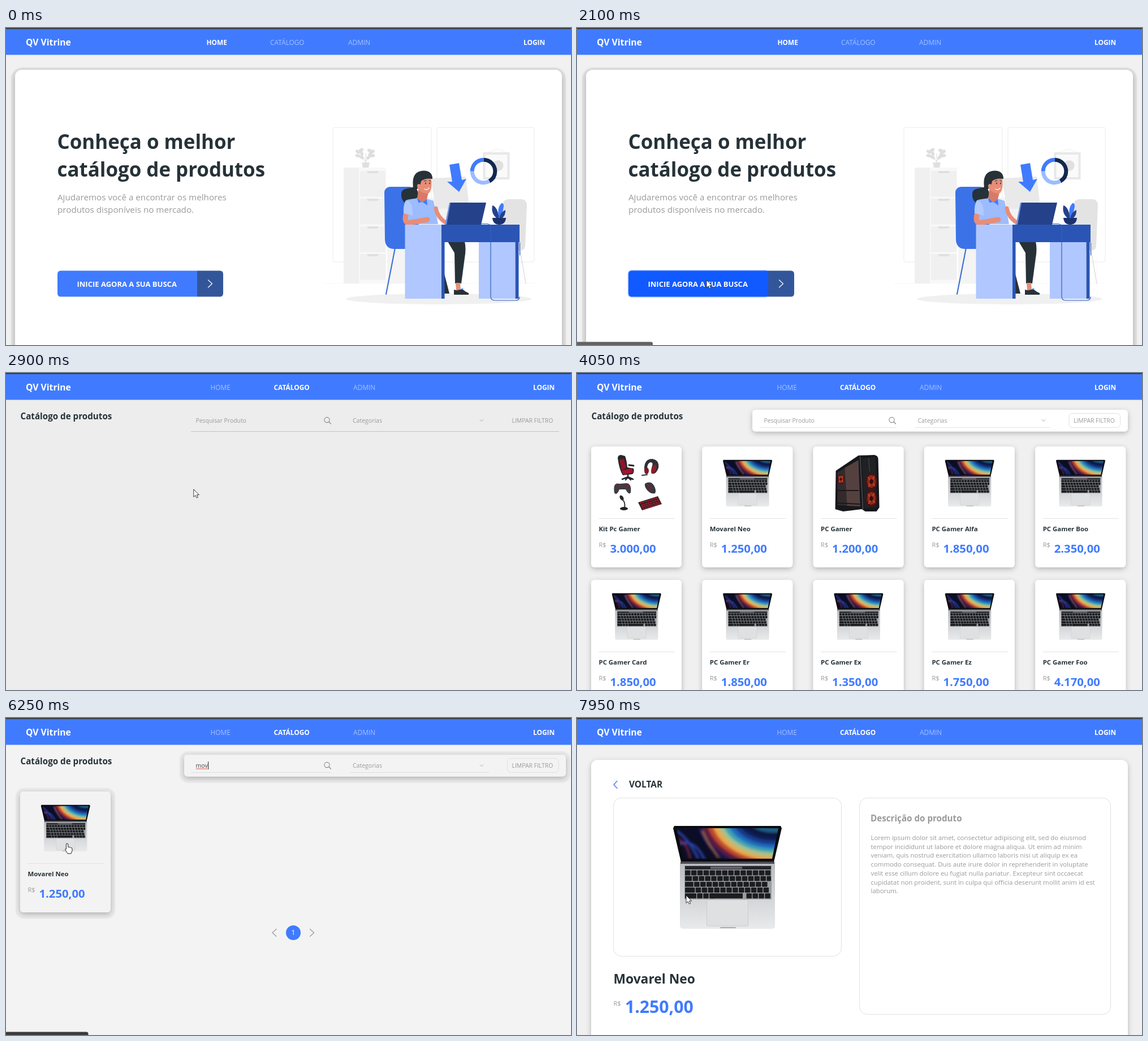
Write an HTML page that moves like this. It is 999 px wide and 561 px high and loops after 8 s.

```html
<!DOCTYPE html>
<html lang="pt-BR">
<head>
<meta charset="utf-8">
<style>
html, body { margin: 0; width: 100%; height: 100%; overflow: hidden; }
svg { display: block; width: 999px; height: 561px; font-family: "Open Sans", sans-serif; }
text { white-space: pre; }
</style>
</head>
<body>
<svg id="stage" viewBox="0 0 999 561"></svg>
<script>
const BLUE = '#407bff', INK = '#263238', GREY = '#9a9a9a', SKIN = '#e88d77';
const NAVY = '#24418a', DESK = '#2a55b5', PALE = '#b0c7ff';
const BRAND = 'QV Vitrine', LAPTOP = 'Movarel Neo', QUERY = 'mov';
const SHADOW = 'filter="url(#shadow)"';

const text = (x, y, s, size, fill = INK, weight = 700, extra = '') =>
  `<text x="${x}" y="${y}" font-size="${size}" fill="${fill}" font-weight="${weight}" ${extra}>${s}</text>`;
const rect = (x, y, w, h, fill, r = 0, extra = '') =>
  `<rect x="${x}" y="${y}" width="${w}" height="${h}" rx="${r}" fill="${fill}" ${extra}/>`;
const path = (d, fill, extra = '') => `<path d="${d}" fill="${fill}" ${extra}/>`;
const line = (d, color, w = 1, extra = '') =>
  path(d, 'none', `stroke="${color}" stroke-width="${w}" stroke-linecap="round" stroke-linejoin="round" ${extra}`);
const oval = (x, y, rx, ry, fill, extra = '') =>
  `<ellipse cx="${x}" cy="${y}" rx="${rx}" ry="${ry}" fill="${fill}" ${extra}/>`;
const group = (id, s) => `<g id="${id}">${s}</g>`;
const box = (x, y, w, h, r) => rect(x, y, w, h, 'none', r, 'stroke="#e1e1e1"');

function header(active, xs, login) {
  const names = ['HOME', 'CATÁLOGO', 'ADMIN'];
  return rect(0, 0, 999, 47.5, BLUE) + rect(0, 0, 999, 2, '#3a3d43') + text(35, 31, BRAND, 15.7, '#fff') +
    names.map((n, i) => text(xs[i], 30, n, 11.9, i == active ? '#fff' : '#a5c1ff', i == active ? 700 : 400)).join('') +
    text(login, 30, 'LOGIN', 11.9, '#fff');
}
const narrowHead = header(1, [353.5, 465, 606], 915);
const wideHead = header(1, [361.5, 473.5, 614], 932);
const page = bg => rect(0, 0, 999, 561, bg);

// Laptop, 192 x 183
function laptop() {
  const arcs = ['#1c1550', '#5d1c3c', '#c2492f', '#e8a94c', '#a9c08a', '#39a3b4', '#2368bd', '#163a86', '#101c52', '#0d1640', '#1d5f86']
    .map((c, i) => oval(178, -14, 132 - i * 9, 92 - i * 7, 'none', `stroke="${c}" stroke-width="9.5"`)).join('');
  let keys = '';
  for (let r = 0; r < 5; r++) {
    const first = 9.6 + r * 2.6;
    keys += rect(21, 79.5 + r * 10.2, first, 8.9, '#1b1d21', 1);
    for (let x = 22.3 + first, c = 0; x < 166; x += 10.9, c++) {
      if (r == 4 && c > 2 && c < 8) continue;
      keys += rect(x, 79.5 + r * 10.2, Math.min(9.6, 173 - x), 8.9, '#1b1d21', 1);
    }
  }
  return path('M2 1H190L192 5L178 65H14L0 5z', '#0a0b0e') +
    path('M6 5H186L175 59H18z', '#0b0d26') +
    `<g clip-path="url(#screen)"><g filter="url(#soft)">${arcs}${line('M0 40Q34 14 56 62M6 10Q26 22 44 58', '#2a45b0', 4)}${line('M6 24Q24 28 30 58', '#8d2746', 3)}${line('M52 10Q60 30 80 58', '#c9813f', 2)}</g></g>` +
    rect(12, 64, 168, 119, 'url(#metal)', 5) + rect(13, 64, 166, 4, '#4b4d52') +
    rect(20, 71, 154, 60, '#9b9da1', 1) + rect(21, 72, 152, 6, '#24262b') + rect(66, 73, 56, 4, '#6a6170') +
    keys + rect(65, 120.3, 58, 8.9, '#1b1d21', 1) +
    rect(59.5, 132, 73, 46, '#dfe0e2', 1, 'stroke="#cbcccf"') + rect(83, 180, 28, 2, '#aaa', 1);
}

// Gaming set and tower, drawn inside one 160 x 214 card
const kit = path('M47 21Q47 15 53 15L60 17Q63 25 64 37L75 39Q77 46 73 49L56 51Q50 42 47 21z', '#25272c') +
  path('M50 23L58 22L62 37L54 43z', '#8f1529') + path('M54 43L71 38L75 46L57 50z', '#a2142c') + line('M67 33L75 34', '#25272c', 3) +
  line('M65 50V56M55 58L65 54L74 58M61 59L65 54L70 59', '#24262a', 2.5) +
  path('M94 42Q93 22 108 22Q121 24 119 38Q115 50 107 48Q105 44 108 34Q110 28 105 28Q98 30 99 44Q96 47 94 42z', '#2e3036') +
  oval(111, 40, 4, 8, '#8e1b2c', 'transform="rotate(20 111 40)"') + oval(98, 43, 4, 6, '#7d1a28') + line('M99 50L90 51', '#333', 2) +
  path('M41 82Q38 63 50 66L62 65Q72 65 70 82Q66 86 61 76H50Q45 88 41 82z', '#3b3d43') +
  oval(48, 70, 2.5, 2.5, '#8e1b2c') + oval(64, 70, 2.5, 2.5, '#8e1b2c') +
  path('M95 66Q105 60 111 69Q116 78 113 83Q105 85 98 76Q94 70 95 66z', '#36383d') + line('M99 67Q106 72 107 80', '#8e1b2c', 2) +
  oval(54, 91, 3, 5, '#24262a', 'transform="rotate(-30 54 91)"') + line('M55 94Q61 98 59 109', '#333', 2) + oval(58, 110, 7, 3, '#222') +
  path('M83 99L118 88L125 102L90 113z', '#3a1c22') +
  line('M87 100L117 91M89 104L119 94.5M90 107L121 98M92 110L122 101', '#a51e30', 2, 'stroke-dasharray="1.6 2.6"');
const fan = (x, y, rx, ry) => oval(x, y, rx, ry, '#4a1310') + oval(x, y, rx * .75, ry * .75, '#8f2a1c') +
  line(`M${x - rx * .6} ${y - ry * .5}L${x + rx * .6} ${y + ry * .5}M${x + rx * .5} ${y - ry * .6}L${x - rx * .5} ${y + ry * .6}`, '#d2452b', 1.6) +
  oval(x, y, rx * .3, ry * .3, '#33100e');
const tower = path('M40 43L80 16L108 15Q115 16 115 23L117 108L112 115H92L86 111L53 115L39 111z', '#17181b') +
  path('M43 46L80 24L83 106L43 104z', '#332a2d') + path('M56 38L80 24L83 106L60 105z', '#54413f') +
  line('M42 78L80 78M42 100L82 102', '#1d1719', 2) + fan(49, 58, 6, 9) +
  path('M86 22L110 18L112 108L90 109z', '#202124') + line('M98 21L100 44', '#4a4c52') + fan(103, 62, 10, 15) + fan(103, 92, 10, 15) +
  line('M83 18L88 111', '#4a4d54', 1.5);

function card(x, y, name, price, art, fill = '#fff') {
  return `<g transform="translate(${x} ${y})">` + rect(0, 0, 160, 214, fill, 6, SHADOW) +
    (art || '<use href="#laptop" transform="translate(36.8 23.3) scale(.453)"/>') +
    rect(13.5, 127, 134, 1, '#e1e1e1') + text(13.5, 150, name, 11.4) +
    text(13.5, 178, 'R$', 11, GREY, 400) + text(33.5, 188, price, 20.3, BLUE) + '</g>';
}
const chevron = (x, y, w, h, color = '#999') => line(`M${x - w} ${y - h}L${x + w} ${y}L${x - w} ${y + h}`, color, 1.2);
const pager = (y, color) => chevron(474.5, y, -3.5, 6.5, color) + oval(508, y, 13, 13, BLUE) +
  text(508, y + 4.3, '1', 12, '#fff', 400, 'text-anchor="middle"') + chevron(541, y, 3.5, 6.5, color);

function filterItems(cat, arrow, clear, lens) {
  return text(cat, 88, 'Categorias', 10.5, GREY, 400) + line(`M${arrow - 3} 82.5l3 3l3 -3`, '#aaa') +
    text(clear, 88, 'LIMPAR FILTRO', 10.4, GREY, 400) +
    oval(lens, 83, 4.6, 4.6, 'none', 'stroke="#888" stroke-width="1.1"') + line(`M${lens + 3.5} 86.5l3.5 3.5`, '#888', 1.2);
}
const title = text(25.5, 81.5, 'Catálogo de produtos', 15.2);
const placeholder = x => text(x, 88, 'Pesquisar Produto', 10.4, GREY, 400);
const wideFilter = filterItems(613, 841, 894.5, 567.5);
const halo = (x, y, w, h) => rect(x - 8, y - 6, w + 16, h + 17, '#e9e9e9', 15);

function illustration() {
  const g1 = '#f0f0f0', g2 = '#e0e0e0';
  let s = rect(578, 176, 174, 238, 'none', 3, 'stroke="#ebebeb"') + rect(762, 176, 172, 238, 'none', 3, 'stroke="#ebebeb"') +
    line('M560 452H935', '#f6f6f6') + oval(765, 479.5, 164, 9.5, g1) +
    rect(597, 247, 27, 205, g1) + rect(624, 247, 48, 205, '#f8f8f8') + rect(674, 300, 85, 152, '#f4f4f4');
  for (let i = 0; i < 4; i++)
    s += rect(626, 253 + i * 49, 45, 45.5, g1) + path(`M638 ${253 + i * 49}h21l-2 4h-17z`, g2);
  s += line('M636 238L625 217M636 238L645 214M636 238V222', '#ddd') + path('M629 238H643L641 247H631z', g2);
  for (const [x, y, a] of [[622, 219, 40], [628, 216, -30], [622, 226, 15], [629, 229, 35], [643, 217, 20], [648, 219, -35], [648, 226, -10], [641, 229, -40], [629, 222, 70], [644, 223, 110]])
    s += oval(x, y, 4.5, 2.8, '#dedede', `transform="rotate(${a} ${x} ${y})"`);
  s += line('M850 221L870 214L886 221', '#eee') + rect(845.5, 222, 43, 44, '#fafafa', 0, 'stroke="#e8e8e8" stroke-width="4"') + oval(870, 243.5, 9.5, 9.5, g2) +
    path('M751 266L813 263L818 307L816 320H760z', '#e9e9e9') + rect(762, 320, 20, 18, '#f3f3f3') +
    path('M888 303H912Q921 304 921 314L918 386Q917 394 908 394H870Q878 382 878 314Q878 304 888 303z', '#e3e3e3') + line('M909 394L919 452', g2, 1.5);
  // Chart and arrow
  s += path('M784 242L801 239L806 269L814 267L801 290L780 272L789 272z', BLUE);
  const ring = (c, from, len) => `<circle cx="844.5" cy="253.5" r="20.3" fill="none" stroke="${c}" stroke-width="7" pathLength="360" stroke-dasharray="${len} 360" transform="rotate(${from - 90} 844.5 253.5)"/>`;
  s += ring('#13284f', 0, 150) + ring('#9cbcff', 150, 120) + ring(BLUE, 270, 90);
  // Chair
  s += line('M688 389L672 471M746 385L758 471', '#3769d4', 2) +
    path('M679 281H713Q721 281 722 290L735 391H685Q671 390 670 375L669 292Q669 282 679 281z', '#3c72e8');
  // Person
  s += path('M699 294C699 281 714 286 722 280C731 290 733 300 720 305C708 317 698 306 699 294z', INK) +
    path('M707 305Q735 297 756 306L764 347H709Q703 338 704 320z', '#9cbcff') +
    path('M729 286L747 291L742 311L727 303z', '#d97a66') + path('M727 264H751Q755 284 748 292Q739 295 729 286z', SKIN) +
    path('M720 282Q716 253 739 252.5Q754 253 754 267Q741 265 734 271Q733 280 726 286z', INK) + oval(730, 280, 3, 4, SKIN) +
    line('M739 271l4 -1M748 270l3 1', INK) + oval(742, 275, .9, 1.4, INK) + oval(749, 275, .9, 1.4, INK) + line('M740 285Q745 288 748 283', '#fff', 1.3) +
    path('M727 301L736 309L744 303L745 314L737 308L729 309z', BLUE) + line('M760 319Q763 335 777 344', SKIN, 7) +
    line('M708 327Q703 342 711 345L745 339', SKIN, 9) + path('M707 305Q720 306 719 332L703 328Q702 313 707 305z', '#b1caff') +
    path('M781 378H811Q814 390 811 407L805 452H794L793 398z', INK) + path('M775 435L784 470H775z', INK) +
    path('M795 451H803L804 464H796z', SKIN) + path('M792 463Q800 466 806 461Q812 467 818 469V472H792z', INK) + line('M803 462l5 -1', '#9cbcff', 2);
  // Desk and objects on it
  s += rect(705.5, 348, 64.5, 131, PALE) + rect(836, 378, 64, 101, PALE) + rect(770, 348, 5.5, 131, DESK) +
    rect(770, 348, 138, 31, DESK) + rect(900.5, 379, 6, 100, DESK) +
    line('M840 346.5H851Q857 347 857 353V475Q857 482 864 482H901Q908 482 908 476M908.5 380V402', '#3461bb', 1.2) +
    path('M776 348L784 309H848L839 348z', '#6f94e5') + path('M779 348L786 309H849L840 348z', NAVY) +
    path('M871 334Q868 318 876 310Q882 309 879 321Q878 330 874 336z', BLUE) +
    path('M868 337Q857 328 860 314Q869 316 872 337z', NAVY) + path('M872 337Q874 326 883 322Q884 331 876 338z', NAVY) +
    path('M860 336H884Q883 348 872 348Q861 348 860 336z', '#1b3270');
  return s;
}

const homePage = page('#f1f1f1') + rect(9, 70, 981, 520, '#e2e2e2', 20) + rect(16, 74, 967, 520, '#fff', 12, SHADOW) +
  header(0, [354.5, 467, 605], 915) +
  text(90.5, 214, 'Conheça o melhor', 34.9) + text(90.5, 262.5, 'catálogo de produtos', 34.9) +
  text(91, 305, 'Ajudaremos você a encontrar os melhores', 15.2, GREY, 400) +
  text(91, 326.5, 'produtos disponíveis no mercado.', 15.2, GREY, 400) +
  rect(89.5, 428, 249.5, 49, '#b5cdff', 7, 'id="ring"') +
  path('M338 429.5H378Q384 429.5 384 435.5V469.5Q384 475.5 378 475.5H338z', '#33569b') +
  path('M97 429.5H338V475.5H97Q91 475.5 91 469.5V435.5Q91 429.5 97 429.5z', BLUE, 'id="button"') +
  text(125.5, 457.5, 'INICIE AGORA A SUA BUSCA', 13, '#fff') + chevron(361, 452.5, 3.5, 6.5, '#fff') + illustration();

const emptyPage = page('#ededed') + wideHead + title + placeholder(335.5) + wideFilter + rect(327, 103, 651, 1, '#c3c3c3');

const items = [['Kit Pc Gamer', '3.000,00', kit], [LAPTOP, '1.250,00'], ['PC Gamer', '1.200,00', tower],
  ['PC Gamer Alfa', '1.850,00'], ['PC Gamer Boo', '2.350,00'], ['PC Gamer Card', '1.850,00'], ['PC Gamer Er', '1.850,00'],
  ['PC Gamer Ex', '1.350,00'], ['PC Gamer Ez', '1.750,00'], ['PC Gamer Foo', '4.170,00']];
const gridPage = page('#f0f0f0') + narrowHead + title + rect(310, 65, 664, 38.5, '#fff', 6, SHADOW) +
  rect(323, 96, 242, 1, '#e3e3e3') + rect(597, 96, 240, 1, '#e3e3e3') + box(870, 71.5, 90.5, 25, 6) +
  placeholder(330.5) + filterItems(602.5, 825, 878, 556.5) + rect(331, 77, 1, 14, '#333', 0, 'id="idleCaret"') +
  items.map((it, i) => card(25 + i % 5 * 196.3, i < 5 ? 130 : 366, ...it)).join('');

const searchPage = page('#efefef') + wideHead + title + wideFilter + rect(324, 103, 657, 1.5, '#c6c6c6') + group('pager', pager(384, '#a59b96'));

const resultPage = page('#f3f3f3') + wideHead + title + halo(315, 65, 675, 38.5) + rect(315, 65, 675, 38.5, '#f3f3f3', 6, SHADOW) +
  rect(328, 96, 248, 1, '#dedede') + rect(608, 96, 246, 1, '#dedede') + box(886.5, 71.5, 90.5, 25, 6) + wideFilter +
  halo(25, 130, 160, 214) + card(25, 130, LAPTOP, '1.250,00', '', '#f3f3f3') + pager(380);

const back = line('M71 111.5L65 118L71 124.5', BLUE, 1.4) + text(92, 123, 'VOLTAR', 15.4);
const loadingPage = page('#f3f3f3') + wideHead + rect(25, 74, 965, 473, '#f3f3f3', 12, SHADOW) + back;
const lorem = `Lorem ipsum dolor sit amet, consectetur adipiscing elit, sed do eiusmod
tempor incididunt ut labore et dolore magna aliqua. Ut enim ad minim
veniam, quis nostrud exercitation ullamco laboris nisi ut aliquip ex ea
commodo consequat. Duis aute irure dolor in reprehenderit in voluptate
velit esse cillum dolore eu fugiat nulla pariatur. Excepteur sint occaecat
cupidatat non proident, sunt in culpa qui officia deserunt mollit anim id est
laborum.`.split('\n');
const detailPage = page('#f0f0f0') + rect(25, 74, 949, 520, '#fff', 12, SHADOW) + narrowHead + back +
  box(64.5, 141.5, 403, 280, 14) + box(499.5, 141.5, 444, 383, 14) +
  '<use href="#laptop" x="170" y="190"/>' +
  text(64.5, 469.5, LAPTOP, 22.8) + text(64.5, 509, 'R$', 11, GREY, 400) + text(85, 522, '1.250,00', 30.2, BLUE) +
  text(519, 183, 'Descrição do produto', 15.2, GREY) +
  lorem.map((s, i) => text(519.5, 216 + i * 15.7, s, 11.4, GREY, 400)).join('');

const scenes = [[0, homePage], [2300, emptyPage], [3200, gridPage], [4350, searchPage], [5200, resultPage], [6650, loadingPage], [6950, detailPage]];
const stage = document.getElementById('stage');
stage.innerHTML = `<defs>
  <filter id="shadow" x="-20%" y="-40%" width="140%" height="180%"><feDropShadow dx="0" dy="3" stdDeviation="5" flood-opacity=".25"/></filter>
  <filter id="soft"><feGaussianBlur stdDeviation="2.2"/></filter>
  <linearGradient id="metal" x2="0" y2="1"><stop stop-color="#b9bbc0"/><stop offset="1" stop-color="#e9eaeb"/></linearGradient>
  <clipPath id="screen"><path d="M6 5H186L175 59H18z"/></clipPath>${group('laptop', laptop())}</defs>` +
  scenes.map(([, s], i) => group('scene' + i, s)).join('') +
  group('query', text(335.5, 88, '', 10.5, '#444', 400, 'id="typed"') + rect(0, 77, 1, 14, '#222', 0, 'id="caret"') +
    rect(336, 89.5, 20, 1, '#e0504a', 0, 'id="spell"')) +
  path('M0 555.5H131Q134 555.5 134 559V561H0z', '#626262', 'id="status1"') +
  path('M0 555.5H142Q145.5 555.5 145.5 559V561H0z', '#3b3b3b', 'id="status2"') +
  path('M0 0V13.5L3.2 10.7L5.3 15.2L7.6 14.2L5.6 9.8H9.6z', '#fff', 'id="arrow" stroke="#222" stroke-width=".9"') +
  path('M3 0Q4.8 0 4.8 2V6.5Q6 5.5 7.2 7Q8.6 6 9.6 7.7Q12 7 12 9.5V13L10 18H4L0 11.5Q-1 9 1.4 10V2Q1.4 0 3 0z', '#fff', 'id="hand" stroke="#222"');

const el = id => document.getElementById(id);
const show = (id, on) => el(id).style.display = on ? '' : 'none';
const within = (t, a, b) => t >= a && t < b;

const route = [[250, 866, 0], [600, 610, 190], [1050, 330, 420], [1900, 229, 446], [2300, 229, 446], [2850, 327, 218], [3400, 380, 84],
  [5350, 390, 125], [5650, 270, 296], [5800, 270, 296], [6250, 105, 222], [7100, 105, 222], [7200, 112, 222], [7600, 112, 222],
  [7700, 190, 197], [7800, 282, 245], [7950, 193, 314]];
function pointer(t) {
  let i = 1;
  while (i < route.length - 1 && route[i][0] < t) i++;
  const [a, b] = [route[i - 1], route[i]];
  const k = Math.min(1, Math.max(0, (t - a[0]) / (b[0] - a[0])));
  return [1, 2].map(n => a[n] + (b[n] - a[n]) * k);
}

function draw() {
  const t = Math.floor(performance.now() % 8000 / 50) * 50;
  scenes.forEach(([from], i) => show('scene' + i, within(t, from, scenes[i + 1]?.[0] ?? 8000)));
  el('button').setAttribute('fill', t < 1750 ? BLUE : t < 2000 ? '#2a6bff' : '#105aff');
  show('ring', t >= 2000);
  show('idleCaret', within(t, 3500, 4050));
  show('pager', t >= 4750);
  show('query', within(t, 4350, 6650));
  el('typed').textContent = QUERY.slice(0, t < 4550 ? 1 : t < 4750 ? 2 : 3);
  if (within(t, 4350, 6650)) el('caret').setAttribute('x', 336 + el('typed').getComputedTextLength());
  show('spell', t >= 5350);
  show('status1', within(t, 1800, 2300));
  show('status2', within(t, 6000, 7100));
  const [x, y] = pointer(t), hand = x < 185 && within(t, 5850, 6650);
  show('arrow', !hand && (within(t, 250, 3400) || t >= 5350));
  show('hand', hand);
  for (const id of ['arrow', 'hand']) el(id).setAttribute('transform', `translate(${x} ${y})`);
  requestAnimationFrame(draw);
}
draw();
</script>
</body>
</html>
```
